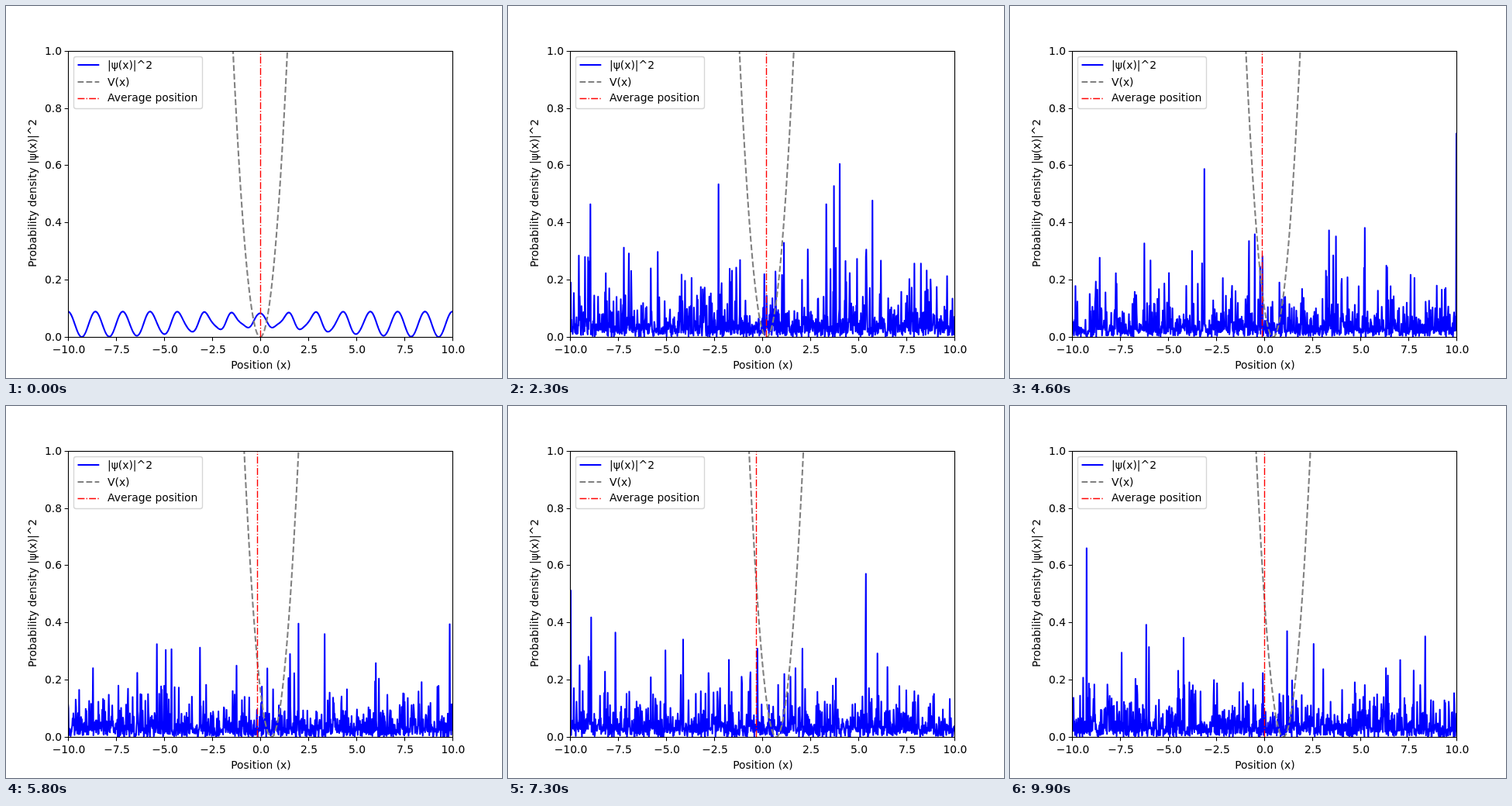
Write an HTML page that moves like this. It is 640x480 px and loops after 10 s.

```html
<!DOCTYPE html>
<html lang="en">
<head>
<meta charset="utf-8">
<title>Probability density</title>
<style>
  html, body { margin: 0; width: 100%; height: 100%; overflow: hidden; background: #fff; }
  svg { display: block; width: 640px; height: 480px; }
  text { font: 13.889px "DejaVu Sans", sans-serif; fill: #000; }
  .mid { text-anchor: middle; }
  .line { fill: none; stroke-linejoin: round; }
  .wave { stroke: #00f; stroke-width: 2.083; }
  .well { stroke: #808080; stroke-width: 2.083; stroke-dasharray: 7.71 3.33; }
  .mean { stroke: #f00; stroke-width: 1.389; stroke-dasharray: 8.89 2.22 1.39 2.22; }
  .axis { fill: none; stroke: #000; stroke-width: 1.11; }
</style>
</head>
<body>
<svg viewBox="0 0 640 480">
  <clipPath id="plot"><rect x="80" y="58" width="496" height="369"/></clipPath>
  <g clip-path="url(#plot)">
    <path id="wave" class="line wave"/>
    <path id="well" class="line well"/>
    <path id="mean" class="line mean"/>
  </g>
  <rect class="axis" x="80.5" y="58.5" width="496" height="369"/>
  <path id="ticks" class="axis"/>
  <g id="labels"></g>
  <text class="mid" x="329" y="468">Position (x)</text>
  <text class="mid" transform="translate(39 241.5) rotate(-90)">Probability density |ψ(x)|^2</text>
  <rect x="87.5" y="65.5" width="166" height="67" rx="2.8" fill="#fff" fill-opacity=".8" stroke="#ccc" stroke-opacity=".8" stroke-width="1.39"/>
  <path class="line wave" d="M92.5 76H120.3"/>
  <path class="line well" d="M92.5 98H120.3"/>
  <path class="line mean" d="M92.5 119.5H120.3"/>
  <text x="131" y="81">|ψ(x)|^2</text>
  <text x="131" y="103">V(x)</text>
  <text x="131" y="123">Average position</text>
</svg>
<script>
const $ = id => document.getElementById(id);
const px = x => 328 + x * 24.8;
const py = v => 427.2 - v * 369.6;
const snap = p => Math.floor(p + 0.5) + 0.5;
const POINTS = 1000, STEPS = 100, STEP_MS = 100;

// Key points of the average position: [step, x].
const drift = [[0, 0], [13, 0.45], [34, -0.11], [58, -0.15], [73, -0.32], [99, 0]];

function average(n) {
  const i = Math.max(1, drift.findIndex(([step]) => step >= n));
  const [n0, x0] = drift[i - 1], [n1, x1] = drift[i];
  const ease = (1 - Math.cos(Math.PI * (n - n0) / (n1 - n0))) / 2;
  return x0 + (x1 - x0) * ease;
}

// Seeded generator of numbers in [0, 1).
function random(seed) {
  let s = seed * 7919 + 17;
  return () => {
    s = (s + 0x6D2B79F5) | 0;
    let t = Math.imul(s ^ (s >>> 15), 1 | s);
    t = (t + Math.imul(t ^ (t >>> 7), 61 | t)) ^ t;
    return ((t ^ (t >>> 14)) >>> 0) / 4294967296;
  };
}

// Standing wave whose nodes fill in towards the centre.
function standing(x) {
  const a = 1.4 * Math.PI * x;
  const low = 0.036 * Math.exp(-((x / 4.5) ** 2));
  const high = 0.089 - 0.006 * Math.exp(-((x / 3) ** 2));
  const skew = Math.exp(-((x / 5) ** 2)) *
    (0.003 * (Math.cos(2 * a) - 1) + 0.006 * Math.sin(2 * a) * Math.tanh(1.5 * x));
  return Math.max(0, low + (high - low) * (1 + Math.cos(a)) / 2 + skew);
}

// The wave dissolves into a steady amplitude plus random complex noise.
function density(n) {
  const rnd = random(n);
  const exponential = () => -Math.log(1 - rnd());
  const mix = Math.min(1, n / 4);
  return Array.from({ length: POINTS }, (_, i) => {
    const x = -10 + 20 * i / (POINTS - 1);
    const base = Math.sqrt(standing(x) * (1 - mix) + 0.023 * mix);
    const r = 0.163 * mix * Math.sqrt(exponential() * exponential());
    const phase = 2 * Math.PI * rnd();
    return (base + r * Math.cos(phase)) ** 2 + (r * Math.sin(phase)) ** 2;
  });
}

const polyline = pts => "M" + pts.map(([x, y]) => x.toFixed(2) + " " + y.toFixed(2)).join("L");

function draw(n) {
  const wave = density(n).map((v, i) => [80 + 496 * i / (POINTS - 1), py(v)]);
  $("wave").setAttribute("d", polyline(wave));

  // The dashes of the well start at the top edge of the stage.
  const half = Math.sqrt(2 * 428.2 / 369.6);
  const curve = [];
  for (let i = 0; i <= 150; i++) {
    const u = half * (i / 75 - 1);
    curve.push([px(n / 100 + u), py(u * u / 2)]);
  }
  $("well").setAttribute("d", polyline(curve));
  $("mean").setAttribute("d", `M${snap(px(average(n)))} 427.5V58`);
}

function drawAxes() {
  let ticks = "", labels = "";
  for (let x = -10; x <= 10; x += 2.5) {
    ticks += `M${snap(px(x))} 427.5v4.86`;
    labels += `<text class="mid" x="${px(x) + 1}" y="448">${x.toFixed(1).replace("-", "\u2212")}</text>`;
  }
  for (let i = 0; i <= 5; i++) {
    const y = py(i / 5);
    ticks += `M80.5 ${snap(y)}h-4.86`;
    labels += `<text x="50" y="${Math.round(y + 5)}">${(i / 5).toFixed(1)}</text>`;
  }
  $("ticks").setAttribute("d", ticks);
  $("labels").innerHTML = labels;
}

let shown = -1;
const start = performance.now();
function tick() {
  const n = Math.floor((performance.now() - start) / STEP_MS) % STEPS;
  if (n !== shown) draw(shown = n);
  requestAnimationFrame(tick);
}
drawAxes();
tick();
</script>
</body>
</html>
```
